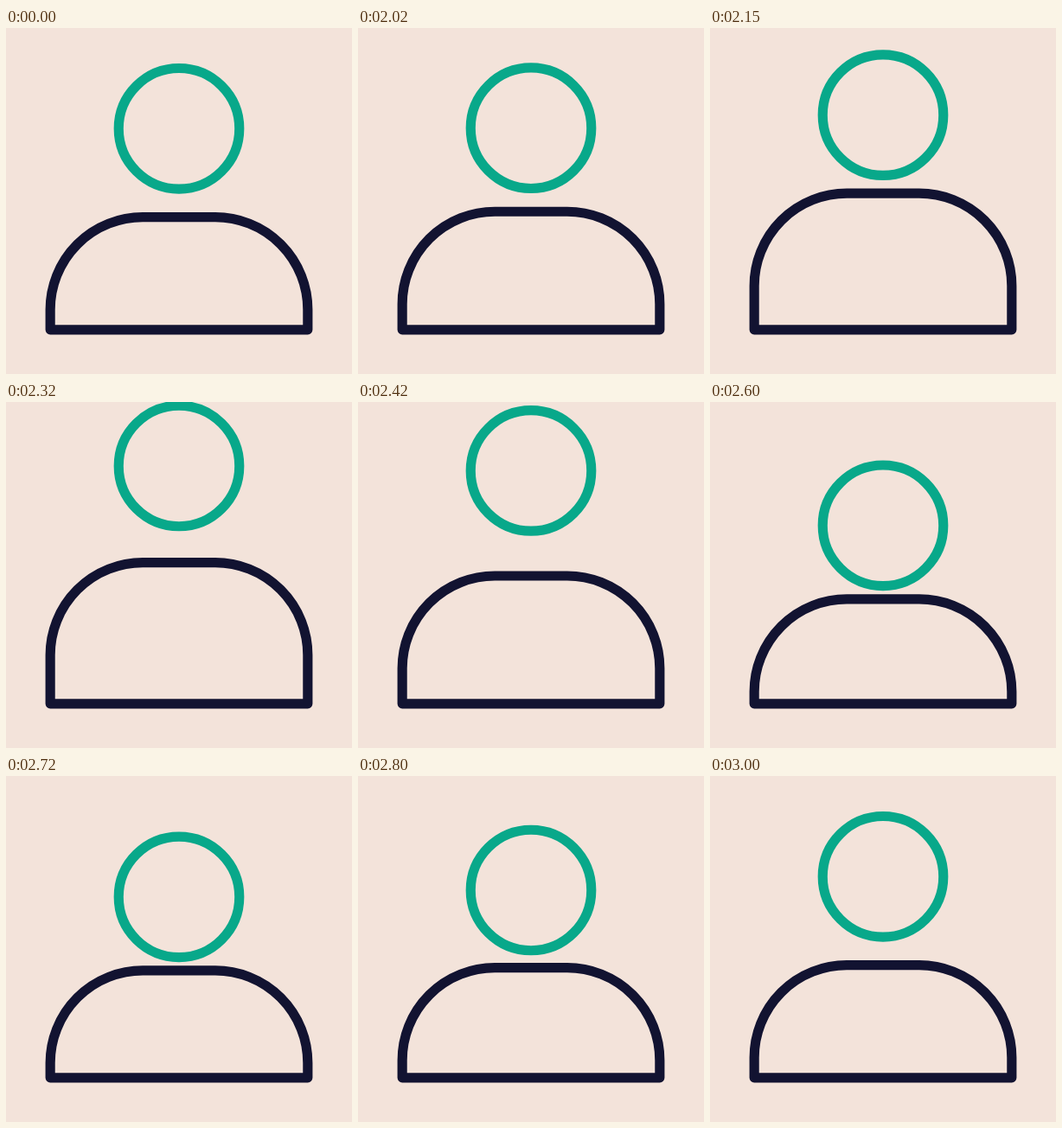
Recreate the animation shown at these times as an HTML page with a canvas. Size 400x400 px, loop 3.02 s.

```html
<!DOCTYPE html>
<html lang="en">
<head>
<meta charset="utf-8">
<title>Jumping user icon</title>
<style>
  html, body { margin: 0; width: 100%; height: 100%; overflow: hidden; background: #f3e3da; }
  canvas { display: block; width: 400px; height: 400px; }
</style>
</head>
<body>
<canvas id="stage"></canvas>
<script>
const SIZE = 400, UNITS = 430, LOOP = 3020, STEP = 25;
const canvas = document.getElementById('stage');
const ctx = canvas.getContext('2d');
const dpr = window.devicePixelRatio || 1;
canvas.width = canvas.height = SIZE * dpr;

const smooth = x => x * x * (3 - 2 * x);
const launch = x => 1 - Math.pow(1 - x, 2.4);

// Keys: [time, value, easing towards this key]
const headKeys = [[2000, 125], [2375, 77.2, smooth], [2625, 155.7, smooth], [3000, 125, smooth]];
const bodyKeys = [[2000, 235], [2300, 198.6, launch], [2600, 245, smooth], [2925, 235, smooth]];

function valueAt(keys, t) {
  if (t <= keys[0][0]) return keys[0][1];
  for (let i = 1; i < keys.length; i++) {
    const [t0, v0] = keys[i - 1];
    const [t1, v1, ease] = keys[i];
    if (t < t1) return v0 + (v1 - v0) * ease((t - t0) / (t1 - t0));
  }
  return keys[keys.length - 1][1];
}

function drawHead(y) {
  ctx.strokeStyle = '#08a88a';
  ctx.beginPath();
  ctx.arc(215, y, 75, 0, Math.PI * 2);
  ctx.stroke();
}

function drawBody(top) {
  const left = 55, right = 375, bottom = 375, r = 115;
  ctx.strokeStyle = '#121331';
  ctx.beginPath();
  ctx.moveTo(left, bottom);
  ctx.lineTo(left, top + r);
  ctx.arc(left + r, top + r, r, Math.PI, Math.PI * 1.5);
  ctx.arc(right - r, top + r, r, -Math.PI / 2, 0);
  ctx.lineTo(right, bottom);
  ctx.closePath();
  ctx.stroke();
}

function draw(now) {
  // The motion advances in 25 ms steps, on a 10 ms clock
  const t = STEP * Math.floor((now % LOOP + 5) / STEP);
  const scale = SIZE / UNITS * dpr;
  ctx.setTransform(scale, 0, 0, scale, 0, 0);
  ctx.fillStyle = '#f3e3da';
  ctx.fillRect(0, 0, UNITS, UNITS);
  ctx.lineWidth = 12;
  ctx.lineJoin = 'round';
  drawHead(valueAt(headKeys, t));
  drawBody(valueAt(bodyKeys, t));
}

const start = performance.now();
function tick() {
  draw(performance.now() - start);
  requestAnimationFrame(tick);
}
tick();
</script>
</body>
</html>
```
